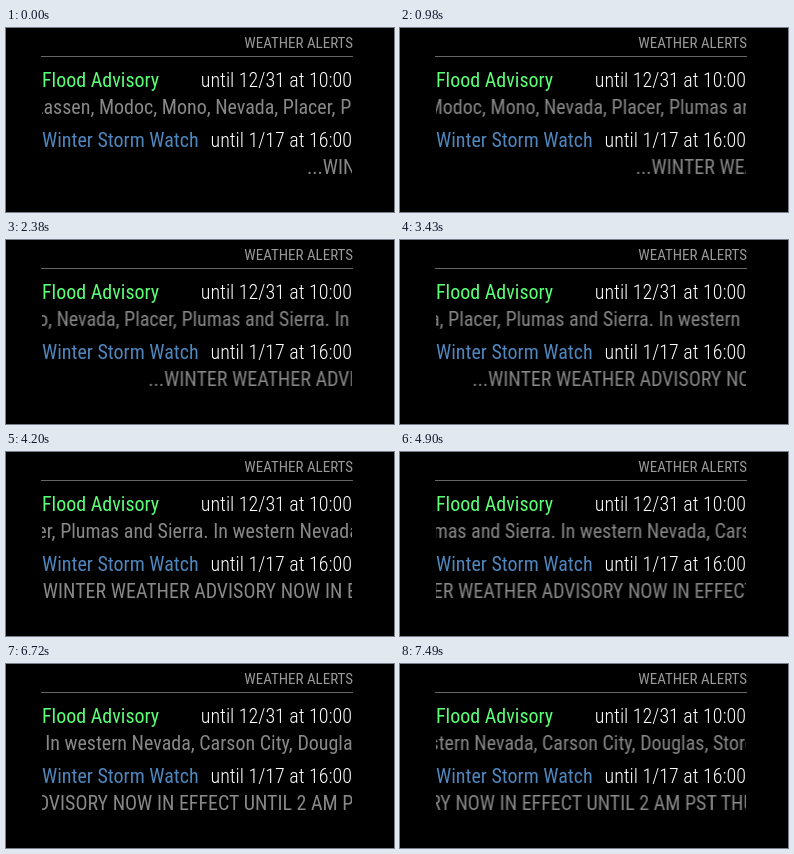
These frames come from a looping animation (388 by 184 pixels, 7.63 s). An HTML page:

```html
<!DOCTYPE html>
<html lang="en">
<head>
<meta charset="utf-8">
<title>Weather alerts</title>
<style>
  html, body {
    margin: 0;
    width: 100%;
    height: 100%;
    overflow: hidden;
    background: #000;
  }
  body {
    position: relative;
    font: 400 20px/25px "Roboto Condensed", Roboto, sans-serif;
    font-stretch: 75%;
    text-rendering: optimizeLegibility;
    -webkit-font-smoothing: antialiased;
    white-space: nowrap;
  }
  header {
    position: absolute;
    left: 35px;
    top: 8px;
    width: 312px;
    height: 20px;
    border-bottom: 1px solid #666;
    font-size: 15px;
    line-height: 15px;
    text-align: right;
    color: #999;
  }
  .row {
    position: absolute;
    left: 36px;
    width: 310px;
    height: 25px;
    overflow: hidden;
    color: #888;
  }
  .row span, header span { display: inline-block; }
  .name { transform-origin: left; }
  .until {
    position: absolute;
    right: 0;
    font-weight: 300;
    color: #fff;
  }
  .until, header span { transform-origin: right; }
  .flood { color: #5bff76; }
  .storm { color: #4f86bd; }

  .ticker {
    position: absolute;
    left: var(--from);
    animation: scroll 7630ms infinite;
  }
  .ticker span { transform-origin: left; }

  /* 107 moves of 70 ms, then the last pose is held */
  @keyframes scroll {
    0% { transform: translateX(0); animation-timing-function: steps(107, end); }
    98.1651% { transform: translateX(-499.33px); }
    100% { transform: translateX(-499.33px); }
  }

  /* used when no condensed face is available */
  .wide span { transform: scaleX(.885); }
</style>
</head>
<body>
  <header><span>WEATHER ALERTS</span></header>

  <div class="row" style="top:40px">
    <span class="name flood">Flood Advisory</span>
    <span class="until">until 12/31 at 10:00</span>
  </div>
  <div class="row" style="top:67px">
    <div class="ticker" style="--from:-8px"><span>Lassen, Modoc, Mono, Nevada, Placer, Plumas and Sierra. In western Nevada, Carson City, Douglas, Storey, Washoe</span></div>
  </div>

  <div class="row" style="top:100px">
    <span class="name storm">Winter Storm Watch</span>
    <span class="until">until 1/17 at 16:00</span>
  </div>
  <div class="row" style="top:127px">
    <div class="ticker" style="--from:265px"><span>...WINTER WEATHER ADVISORY NOW IN EFFECT UNTIL 2 AM PST THURSDAY...</span></div>
  </div>

<script>
  const title = document.querySelector('.flood');
  if (title.offsetWidth > 124) document.body.classList.add('wide');
</script>
</body>
</html>
```
